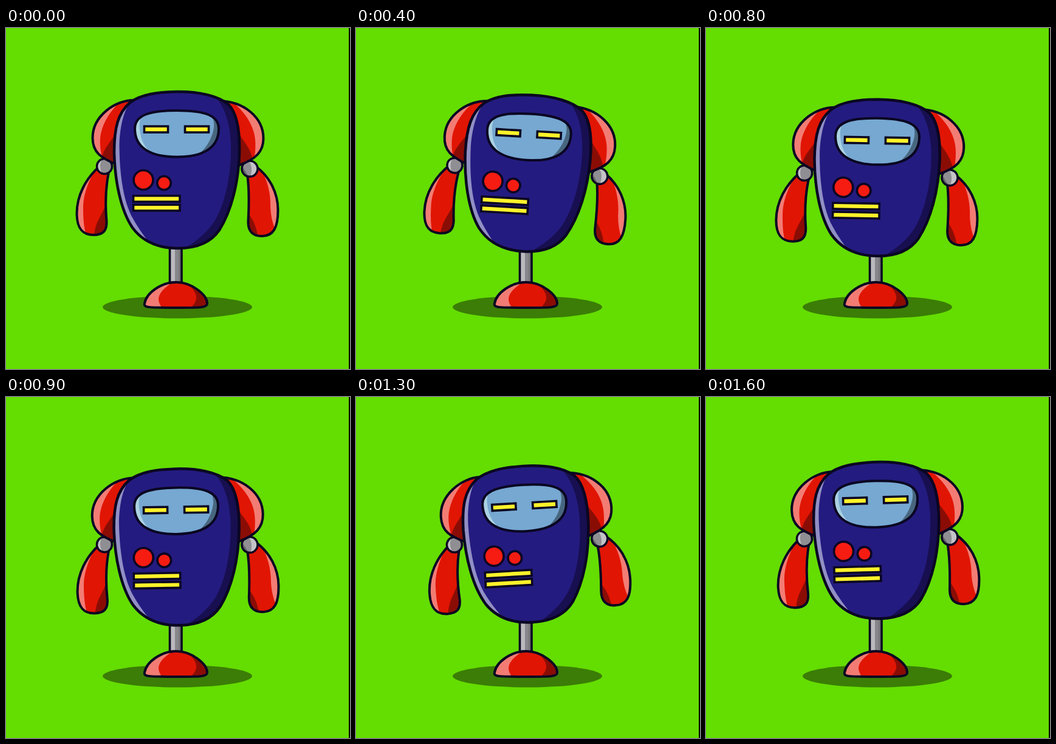
Animation of 566x562 px, one loop 1.7 s. Source, as an HTML page:

```html
<!DOCTYPE html>
<html>
<head>
<meta charset="utf-8">
<title>Robot</title>
<style>
html, body { margin: 0; width: 100%; height: 100%; overflow: hidden; background: #64dd00; }
svg { display: block; width: 100%; height: 100%; }
</style>
</head>
<body>
<svg id="stage" viewBox="0 0 566 562" preserveAspectRatio="none"></svg>
<script>
const INK = '#0a0622', RED = '#e11503', PINK = '#f27c74', MAROON = '#8a0d05', YELLOW = '#fff32a';
const LOOP = 1700, STEP = 100;
let clips = 0;

// A filled outline with flat shades clipped inside it
function part(d, fill, shades = [], width = 4) {
  const id = 'c' + clips++;
  const inner = shades.map(([color, path]) => `<path d="${path}" fill="${color}"/>`).join('');
  return `<clipPath id="${id}"><path d="${d}"/></clipPath>
    <path d="${d}" fill="${fill}"/><g clip-path="url(#${id})">${inner}</g>
    <path d="${d}" fill="none" stroke="${INK}" stroke-width="${width}" stroke-linejoin="round"/>`;
}

const disc = (x, y, r) => `M${x - r} ${y}a${r} ${r} 0 1 1 ${2 * r} 0a${r} ${r} 0 1 1 ${-2 * r} 0Z`;
const bar = (x, y, w, h) =>
  `<rect x="${x}" y="${y}" width="${w}" height="${h}" fill="${YELLOW}" stroke="${INK}" stroke-width="3.6"/>`;
const lamp = (x, y, r) =>
  `<circle cx="${x}" cy="${y}" r="${r}" fill="#f71c12" stroke="${INK}" stroke-width="3.6"/>`;

const leftArm =
  part('M154 228C132 247 116 276 116.500 307C117 331 126 341 144 341C160 341 166 334 165.500 319C163 290 164 262 169 238Z', RED, [
    [PINK, 'M160 215C140 240 127 270 127 296C127 315 128 330 133 345L105 345V215Z'],
    [MAROON, 'M170 272C164 298 154 310 149 323C146 332 145 338 145 346H180V272Z']
  ]) +
  part(disc(162, 228, 12.5), '#8f8e93', [
    ['#c4c4c8', 'M148 212H162C153 220 153 232 160 243H148Z'],
    ['#66656b', 'M177 225C174 235 168 238 160 243H178Z']
  ], 3.5) +
  part('M212 119C180 118 142.500 145 142.500 181C142.500 205 156 214 182 225L215 190Z', RED, [
    [PINK, 'M198 114C174 130 157 158 155 182C154 198 157 208 160 222L130 222V114Z'],
    [MAROON, 'M184 166C174 188 162 195 158 213L184 230Z']
  ]);

const rightArm =
  part('M397 242C400 262 400 290 398.500 319C398 336 407 343 421 343C440 343 447.500 329 447.500 300C447.500 272 434 245 411 228Z', RED, [
    [PINK, 'M412 220C429 244 435 270 435 290C435 306 438 320 443 332L460 320V220Z'],
    [MAROON, 'M390 296C402 308 412 322 415 348L390 348Z']
  ]) +
  part(disc(401, 232, 13), '#8f8e93', [
    ['#c4c4c8', 'M398 217C405 225 406 237 401 247H416V217Z'],
    ['#66656b', 'M386 223C392 233 395 239 401 247H386Z']
  ], 3.5) +
  part('M348 120C392 120 423.500 148 423.500 182C423.500 204 411 216 384 226L350 190Z', RED, [
    [PINK, 'M362 114C389 132 408 158 410 184C411 198 410 208 407 222L440 222V114Z'],
    [MAROON, 'M382 172C390 186 401 196 405 213L382 230Z']
  ]);

const body = part(
  'M281 105C318 104.500 350 112 366 126C381 141 385 175 384 208C382 256 371 301 351 333C336 355 310 363 283 363' +
  'C250 363 225 352 208 329C188 299 179 250 178 205C178 165 184 140 204 123C222 109 250 105.500 281 105Z', '#241b80', [
    ['#918fc4', 'M220 104C196 122 187 158 186.500 196C187 245 194 290 210 316C220 334 230 346 244 366L160 360V104Z'],
    ['#170f50', 'M324 98C355 113 368 148 370 190C371 240 362 285 344 317C329 340 312 352 287 368H400V98Z']
  ], 4.5);

const visor = part(
  'M281 136C327 136 350 144 350 166C350 197 325 212.500 281 212.500C237 212.500 212 197 212 166C212 144 235 136 281 136Z', '#76a8d1', [
    ['#abd2e2', 'M236 130C219 143 218 158 221 174C223 190 233 201 246 214H205V130Z'],
    ['#48677f', 'M328 132C344 146 344 160 340 173C335 190 326 201 311 214H356V132Z']
  ], 4);

const stand =
  '<ellipse cx="282" cy="460" rx="123" ry="18.500" fill="#3b7d06"/>' +
  part('M269.500 340H289V430H269.500Z', '#87868b', [
    ['#b9b9be', 'M270 340H278V430H270Z'],
    ['#77767b', 'M284 340H290V430H284Z']
  ], 3.6) +
  part('M228 454C231 436 256 419 280 419C306 419 331 440 331 454C331 461 322 461 280 461C236 461 226 461 228 454Z', RED, [
    [PINK, 'M280 416C262 426 252 436 251 446C251 453 254 458 260 465H220V416Z'],
    [MAROON, 'M292 416C308 428 314 438 313 446C312 454 305 460 299 465H340V416Z']
  ]);

document.getElementById('stage').innerHTML =
  '<rect width="566" height="562" fill="#64dd00"/>' + stand +
  '<g id="robot">' + leftArm + rightArm + body + visor +
  '<g id="eyes">' + bar(227.5, 162, 39, 10) + bar(294.5, 162, 39, 10) + '</g>' +
  lamp(226, 250.5, 16) + lamp(260, 255.5, 11.3) +
  bar(209.5, 276.5, 76.5, 9.8) + bar(209.5, 291.3, 76.5, 9.8) + '</g>' +
  '<rect x="564" width="2" height="562" fill="#050a00"/>';

const robot = document.getElementById('robot');
const eyes = document.getElementById('eyes');

function draw(now) {
  const t = Math.floor((now % LOOP) / STEP) * STEP;
  const a = 2 * Math.PI * t / LOOP;
  const sink = 13.4 * Math.sin(Math.PI * t / 1850) ** 2;
  const tilt = 3.7 * (Math.sin(a) + 0.1 * Math.sin(3 * a));
  robot.setAttribute('transform', `translate(0 ${sink}) rotate(${tilt} 281 233)`);
  eyes.setAttribute('transform', `translate(0 ${0.42 * sink})`);
}

let start;
function tick(now) {
  start ??= now;
  draw(now - start);
  requestAnimationFrame(tick);
}
draw(0);
requestAnimationFrame(tick);
</script>
</body>
</html>
```
